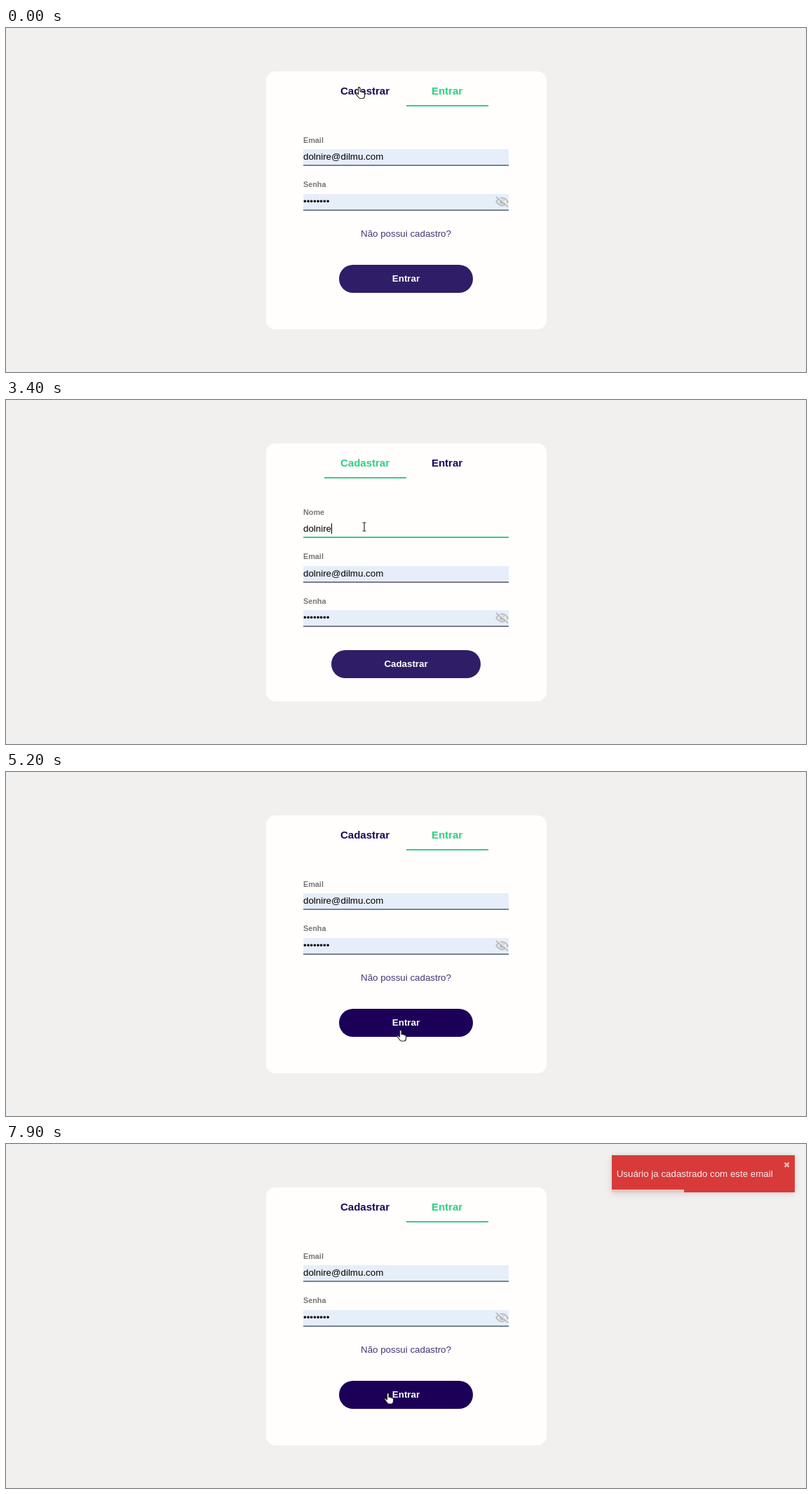
Write an HTML page that moves like this. It is 1141x491 px and loops after 8000 ms.

```html
<!DOCTYPE html>
<html lang="pt">
<head>
<meta charset="utf-8">
<title>Cadastro</title>
<style>
html, body { margin: 0; width: 100%; height: 100%; overflow: hidden; }
body { position: relative; background: #f1f0ee; font: 13.333px "Liberation Sans", Arial, sans-serif; color: #000; }
body div, body svg { position: absolute; white-space: pre; }
#card { left: 370.5px; top: 62px; width: 400px; height: 368px; border-radius: 13px; background: #fffefd; }
.tab { top: 68px; width: 117px; height: 42px; line-height: 44px; border-bottom: 2px solid; text-align: center; font-size: 15px; font-weight: bold; }
#view, .page { left: 0; top: 0; width: 1141px; height: 491px; }
#view { clip-path: inset(130px 387px 65px 387px); }
.label { left: 424px; line-height: 14px; font-size: 10.83px; font-weight: bold; color: #777; }
.field { left: 424px; width: 293px; height: 22px; line-height: 22px; border-bottom: 2px solid; }
.field span { color: #000; }
.field em { font-style: normal; color: #757575; }
.field svg { right: 0; top: 3px; }
#caret { display: inline-block; width: 1px; height: 15px; margin-right: -1px; vertical-align: -3px; background: #000; }
.link { left: 0; width: 1141px; top: 284px; line-height: 20px; text-align: center; color: #463676; }
.button { height: 40px; line-height: 40px; border-radius: 20px; text-align: center; font-weight: bold; color: #fff; }
#toast { left: 864px; top: 16px; width: 261px; height: 53px; background: #d83a39; color: #fbeeed; box-shadow: 0 1px 8px #0000001a, 0 2px 12px #0000000d; }
#message { left: 6.7px; top: 16px; line-height: 21px; }
#close { right: 6.5px; top: 7px; font: bold 11.67px/15px "DejaVu Sans", sans-serif; opacity: .7; }
#bar { left: 0; bottom: 0; width: 261px; height: 4px; background: #ffffffb3; transform-origin: left; }
#cursor { left: 0; top: 0; }
</style>
</head>
<body>
<div id="card"></div>
<div class="tab" id="tabUp" style="left:453.5px">Cadastrar</div>
<div class="tab" id="tabIn" style="left:570.5px">Entrar</div>
<div id="view">
  <div class="page" id="signUp"></div>
  <div class="page" id="signIn"></div>
</div>
<div id="toast">
  <div id="message">Usuário ja cadastrado com este email</div>
  <div id="close">✖</div>
  <div id="bar"></div>
</div>
<svg id="cursor" width="1141" height="491"><path fill="#fff" stroke="#2a2a2a" stroke-width="1.2" stroke-linejoin="round"/></svg>

<script>
const $ = id => document.getElementById(id);
const LOOP = 8000, STEP = 100, PAGE = 366.7;
const NAME = 'dolnire', EMAIL = NAME + '@dilmu.com', SECRET = '•'.repeat(8);
const KEYS = [2600, 2800, 2800, 3000, 3100, 3200, 3400];
const RESET = 4750;

const GREEN = [46, 208, 130], LINE = [63, 199, 143], NAVY = [27, 8, 88], WHITE = [255, 254, 253];
const IDLE = [47, 30, 103], HOVER = [28, 0, 87], GREY = [128, 127, 128], FILLED = [230, 238, 250];
const MAUVE = [124, 122, 148], STEEL = [118, 132, 154];

const eye = `<svg width="19" height="16" viewBox="0 0 19 16" fill="none" stroke="#bdbcbd" stroke-width="2">
  <path d="M1.2 8Q5 2.6 9.5 2.6T17.8 8Q14 13.4 9.5 13.4T1.2 8z"/><circle cx="9.5" cy="8" r="2.6" fill="#bdbcbd"/>
  <path d="M2 .2 19 13.8" stroke="#eef3fb"/><path d="M1 1 18 15"/></svg>`;

function field(id, row, label, extra = '') {
  const y = 173 + 63.5 * row;
  return `<div class="label" style="top:${y - 20.5}px">${label}</div>
    <div class="field" id="${id}" style="top:${y}px"><span></span>${extra}</div>`;
}
const button = (id, x, y, w, text) =>
  `<div class="button" id="${id}" style="left:${x}px;top:${y}px;width:${w}px">${text}</div>`;

$('signUp').innerHTML =
  field('name', 0, 'Nome', '<i id="caret"></i><em></em>') +
  field('upEmail', 1, 'Email', '<em></em>') +
  field('upPass', 2, 'Senha', '<em></em>' + eye) +
  button('upButton', 464, 356.5, 213, 'Cadastrar');
$('signIn').innerHTML =
  field('inEmail', 0, 'Email') + field('inPass', 1, 'Senha', eye) +
  '<div class="link">Não possui cadastro?</div>' +
  button('inButton', 475, 338, 191, 'Entrar');

const SHAPES = {
  hand: 'M4.5 10V2.2a1.3 1.3 0 0 1 2.6 0V7q2-.8 2.4.5 1.8-.6 2.2.6 1.8-.3 1.8 1.4v3.2q0 3.3-2.5 3.8H6.8Q5 16 4 14L1 10.2q-.6-1.2.4-1.6 1-.3 3.1 2z',
  beam: 'M4.5 2.5H7v12M9.5 2.5H7M4.5 14.5h5',
  arrow: 'M3 1v13l3-2.8 2 4.8 2.2-1-2-4.5h4.3z'
};
// time, centre x, centre y, shape from then on
const PATH = [
  [0, 505, 92.5, 'hand'], [100, 506, 97, 'hand'], [200, 506, 97, 'hand'], [300, 509, 100, 'hand'],
  [400, 511, 103, 'hand'], [500, 511, 103, 'hand'], [600, 512, 102, 'hand'], [1200, 512, 103, 'hand'],
  [1300, 513, 125, 'arrow'], [1500, 512, 170, 'arrow'], [1600, 512, 170, 'arrow'], [1700, 512, 176, 'beam'],
  [1900, 511, 181, 'beam'], [4000, 511, 181, 'beam'], [4100, 514, 200, 'arrow'], [4200, 525, 250, 'beam'],
  [4300, 546, 320, 'beam'], [4400, 560, 368, 'hand'], [4500, 564, 376, 'hand'], [5200, 564, 376, 'hand'],
  [5600, 590, 373, 'hand'], [6000, 617, 378.5, 'hand'], [6100, 630, 374, 'hand'], [6200, 656, 365, 'hand'],
  [6300, 692, 350, 'arrow'], [6400, 729, 335, 'arrow'], [6600, 820, 215, 'arrow'], [6800, 890, 62, 'hand'],
  [6900, 902, 47, 'hand'], [7000, 902, 47, 'hand'], [7100, 897, 54, 'hand'], [7200, 870, 88, 'arrow'],
  [7500, 680, 285, 'arrow'], [7600, 615, 342, 'hand'], [7700, 570, 368, 'hand'], [7900, 546, 363, 'hand']
];

const ramp = (t, from, length) => Math.min(1, Math.max(0, (t - from) / length));
const smooth = x => x * x * (3 - 2 * x);
const outCubic = x => 1 - (1 - x) ** 3;
const lerp = (a, b, k) => a + (b - a) * k;
const mix = (a, b, k) => `rgb(${a.map((v, i) => Math.round(lerp(v, b[i], k)))})`;

function setField(id, value, hint, border, fill) {
  const box = $(id), em = box.querySelector('em');
  box.querySelector('span').textContent = value;
  if (em) em.textContent = value ? '' : hint;
  box.style.borderColor = border;
  box.style.background = mix(WHITE, FILLED, fill);
}

function setTab(id, on) {
  $(id).style.color = mix(NAVY, GREEN, on);
  $(id).style.borderColor = mix(WHITE, LINE, on);
}

function drawForms(t) {
  const tab = 1 - ramp(t, 1130, 170) + ramp(t, RESET, 170);
  setTab('tabUp', 1 - tab);
  setTab('tabIn', tab);

  const slide = 1 - smooth(ramp(t, 1150, 350)) + smooth(ramp(t, 4808, 350));
  $('signUp').style.transform = `translateX(${-slide * PAGE}px)`;
  $('signIn').style.transform = `translateX(${(1 - slide) * PAGE}px)`;

  const blank = t >= RESET;
  const typed = blank ? 0 : KEYS.filter(k => t >= k).length;
  const focus = ramp(t, 1750, 200) - ramp(t, 4650, 150);
  const fill = 1 - ramp(t, 4700, 260);
  const border = mix(blank ? GREY : MAUVE, GREY, 0);
  setField('name', NAME.slice(0, typed), 'Seu Nome', mix(GREY, LINE, focus), 0);
  setField('upEmail', blank ? '' : EMAIL, 'Seu email', border, fill);
  setField('upPass', blank ? '' : SECRET, 'Sua senha', border, fill);
  setField('inEmail', EMAIL, '', mix(STEEL, GREY, 0), 1);
  setField('inPass', SECRET, '', mix(STEEL, GREY, 0), 1);

  const blinkOff = t >= 2400 && t < 2600 || t >= 4000 && t < 4500;
  $('caret').style.visibility = t >= 1900 && t < 4700 && !blinkOff ? 'inherit' : 'hidden';

  $('upButton').style.background = mix(IDLE, HOVER, ramp(t, 4350, 150));
  $('inButton').style.background = mix(IDLE, HOVER,
    ramp(t, 5000, 200) - ramp(t, 6150, 200) + ramp(t, 7550, 200));
}

function drawToast(t) {
  const start = 5748;
  const stops = [[0, 3000], [.6, -25], [.75, 10], [.9, -5], [1, 0]];
  const p = ramp(t, start, 700);
  const i = Math.max(1, stops.findIndex(s => p <= s[0]));
  const [[p0, x0], [p1, x1]] = [stops[i - 1], stops[i]];
  const x = lerp(x0, x1, outCubic((p - p0) / (p1 - p0)));
  const toast = $('toast');
  toast.style.visibility = t > start ? 'visible' : 'hidden';
  toast.style.opacity = outCubic(ramp(p, 0, .6));
  toast.style.transform = `translateX(${x}px)`;
  // The countdown pauses while the pointer is over the toast.
  const elapsed = Math.min(t, 6817) - start + Math.max(0, t - 7153);
  $('bar').style.transform = `scaleX(${1 - ramp(elapsed, 0, 3000)})`;
}

function drawCursor(t) {
  const i = PATH.findLastIndex(p => p[0] <= t);
  const [t0, x0, y0, shape] = PATH[i];
  const [t1, x1, y1] = PATH[i + 1] || [LOOP, x0, y0];
  const k = (t - t0) / (t1 - t0);
  const path = $('cursor').firstChild;
  path.setAttribute('d', SHAPES[shape]);
  path.setAttribute('fill', shape === 'beam' ? 'none' : '#fff');
  path.setAttribute('transform', `translate(${lerp(x0, x1, k) - 7} ${lerp(y0, y1, k) - 8.5})`);
}

const begin = performance.now();
function tick() {
  const now = Math.max(0, performance.now() - begin) % LOOP;
  const t = Math.floor(now / STEP) * STEP;
  drawForms(t);
  drawToast(t);
  drawCursor(t);
  requestAnimationFrame(tick);
}
tick();
</script>
</body>
</html>
```
